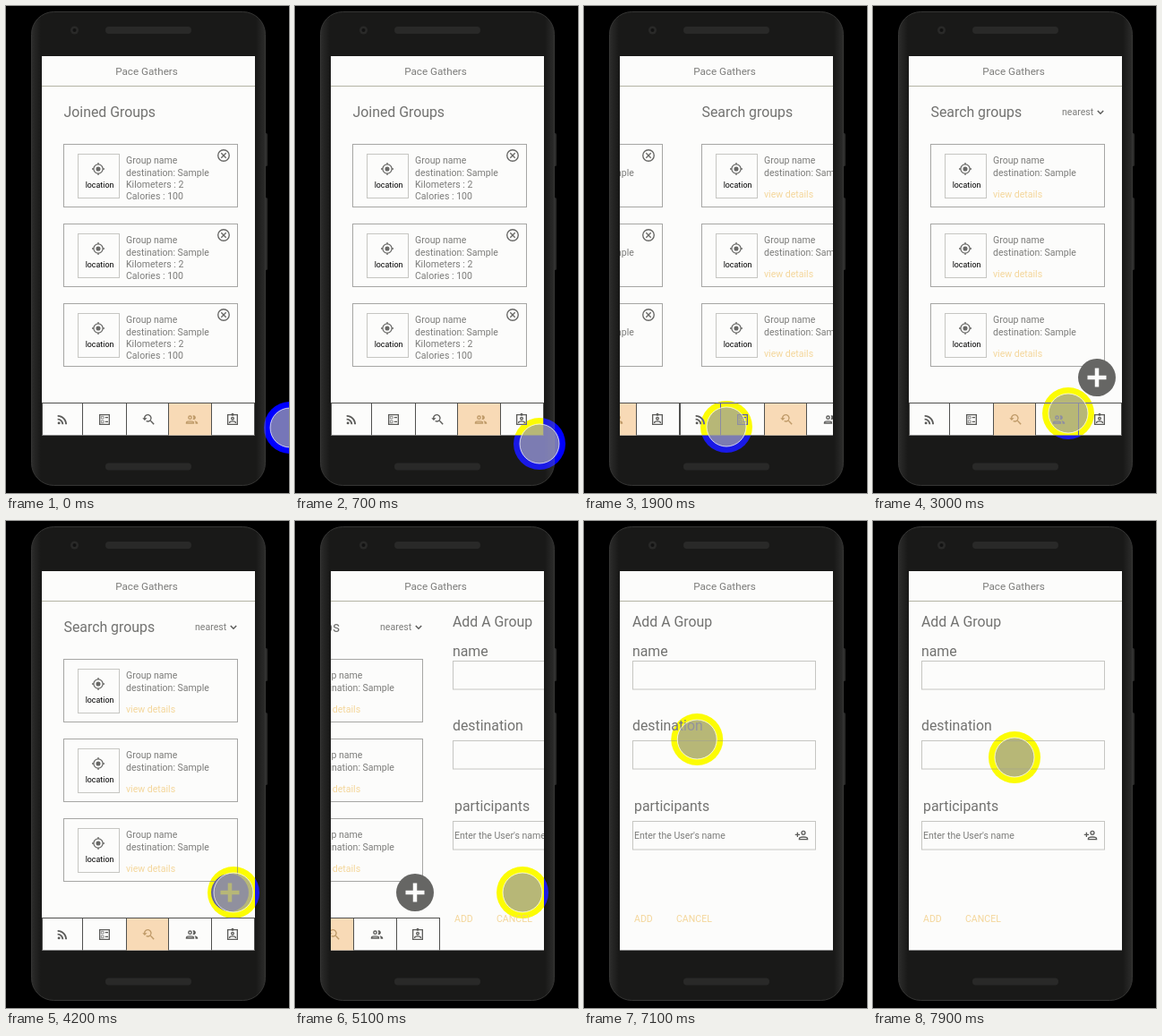
Recreate the animation shown at these times as an HTML page. Size 316 by 544 pixels, loop 8 s.

```html
<!DOCTYPE html>
<html lang="en">
<head>
<meta charset="utf-8">
<title>Group app walkthrough</title>
<style>
html, body { margin: 0; width: 100%; height: 100%; overflow: hidden; background: #000; }
svg { display: block; width: 316px; height: 544px; font-family: Roboto, Arial, sans-serif; }
text { fill: #7c7c7a; font-size: 10.55px; }
.title { font-size: 15.85px; fill: #727270; }
.link { fill: #f4d69a; }
.line { fill: none; stroke: #a6a6a4; stroke-width: 1; }
.field { fill: none; stroke: #c6c6c2; stroke-width: 1; }
.ring { mix-blend-mode: difference; }
</style>
</head>
<body>
<svg viewBox="0 0 316 544">
  <defs>
    <clipPath id="view"><rect x="40" y="90" width="238" height="389.5"/></clipPath>
    <linearGradient id="body">
      <stop offset="0" stop-color="#2c2c2b"/>
      <stop offset=".04" stop-color="#191918"/>
      <stop offset=".96" stop-color="#191918"/>
      <stop offset="1" stop-color="#2c2c2b"/>
    </linearGradient>
  </defs>
  <rect width="316" height="544" fill="#000"/>
  <g fill="#2a2a29">
    <rect x="287" y="142" width="5" height="37" rx="1.5"/>
    <rect x="287" y="214" width="5" height="81" rx="1.5"/>
  </g>
  <rect x="28.5" y="6.5" width="261" height="529" rx="25" fill="url(#body)" stroke="#363635"/>
  <g fill="#292928">
    <rect x="111" y="23" width="96" height="8" rx="4"/>
    <rect x="111" y="510.5" width="96" height="8" rx="4"/>
    <circle cx="76.5" cy="27" r="4.5"/>
  </g>
  <circle cx="76.5" cy="27" r="2" fill="#121212"/>
  <rect x="40" y="56" width="238" height="423.5" fill="#fcfcfb"/>
  <text x="157" y="77" text-anchor="middle" style="font-size:11.7px">Pace Gathers</text>
  <path d="M40 89.5H278" stroke="#b4b4a4"/>
  <g clip-path="url(#view)">
    <g id="joined"></g>
    <g id="search"></g>
    <g id="form"></g>
  </g>
  <g id="cursor">
    <circle class="ring" r="29" fill="#00f"/>
    <circle r="22" fill="#a0a0a0" fill-opacity=".74" stroke="#fff" stroke-opacity=".75"/>
  </g>
</svg>
<script>
const LOOP = 8000, STEP = 100, WIDTH = 238;
const INK = '#686866', TAB_INK = '#5c5c5a';
const el = id => document.getElementById(id);

// Icons on a 24-unit grid
const ICONS = {
  feed: '<path d="M4 4.44v2.83c7.03 0 12.73 5.7 12.73 12.73h2.83c0-8.59-6.97-15.56-15.56-15.56zm0 5.66v2.83c3.9 0 7.07 3.17 7.07 7.07h2.83c0-5.47-4.43-9.9-9.9-9.9z"/><circle cx="6.2" cy="17.8" r="2.2"/>',
  list: '<path fill="none" stroke="currentColor" stroke-width="2" d="M4 4H20V20H4ZM13 8.5H18M13 15.5H18"/><path fill="none" stroke="currentColor" d="M6.5 6.5h4v4h-4zM6.5 13.5h4v4h-4z"/>',
  find: '<path d="M17 14h-.8l-.27-.27A6.5 6.5 0 1 0 4.5 9.5H2l3.84 4 4.16-4H6.5A4.5 4.5 0 1 1 9.2 13.62L7.7 15.1a6.5 6.5 0 0 0 7.52-.67l.27.27v.79l5 5L22 19z"/>',
  people: '<g fill="none" stroke="currentColor" stroke-width="2"><circle cx="9" cy="8.5" r="2.5"/><path d="M3 18v-.75C3 13.9 15 13.9 15 17.25V18Z"/></g><path d="M16 13.8c1.2.85 2 2 2 3.45V19h4v-1.75c0-2-3.5-3.2-6-3.45zM15 12a3.5 3.5 0 1 0-1.5-6.65 5.5 5.5 0 0 1 0 6.3A3.5 3.5 0 0 0 15 12z"/>',
  badge: '<g fill="none" stroke="currentColor" stroke-width="2"><path d="M4 4H20V20H4Z"/><circle cx="12" cy="10" r="2"/><path d="M7 18v-1c0-3 10-3 10 0v1"/></g><circle cx="12" cy="3.5" r="2.3"/>',
  spot: '<circle cx="12" cy="12" r="4"/><g fill="none" stroke="currentColor" stroke-width="2"><circle cx="12" cy="12" r="8"/><path d="M12 1V4M12 20V23M1 12H4M20 12H23"/></g>',
  close: '<g fill="none" stroke="currentColor" stroke-width="2"><circle cx="12" cy="12" r="9.2"/><path d="M8 8L16 16M16 8L8 16"/></g>',
  invite: '<g fill="none" stroke="currentColor" stroke-width="2"><circle cx="15" cy="8" r="3"/><path d="M8 19v-1c0-4 14-4 14 0v1ZM5 7V15M1 11H9"/></g>'
};

const icon = (name, x, y, scale, color) =>
  `<g transform="translate(${x} ${y}) scale(${scale}) translate(-12 -12)" fill="${color}" color="${color}">${ICONS[name]}</g>`;
const text = (x, y, words, cls = '') => `<text x="${x}" y="${y}" class="${cls}">${words}</text>`;
const box = (x, y, w, h, cls) => `<rect x="${x}" y="${y}" width="${w}" height="${h}" class="${cls}"/>`;

function card(y, joined) {
  let out = box(64.5, y + .5, 194, 70, 'line') + box(80.5, y + 11.5, 46, 49, 'field')
    + icon('spot', 103, y + 28, .64, INK)
    + `<text x="104.5" y="${y + 49}" text-anchor="middle" style="font-size:8.9px;fill:#000">location</text>`
    + text(134, y + 22, 'Group name') + text(134, y + 35.5, 'destination: Sample');
  out += joined
    ? text(134, y + 48.5, 'Kilometers : 2') + text(134, y + 61.5, 'Calories : 100')
      + icon('close', 243, y + 13, .68, INK)
    : text(134, y + 59.5, 'view details', 'link');
  return out;
}
const cards = joined => [154, 243, 332].map(y => card(y, joined)).join('');

function tabs(active) {
  const edges = [40.5, 85.5, 134.5, 181.5, 229.5, 277.5];
  const names = ['feed', 'list', 'find', 'people', 'badge'];
  const centres = [63, 110, 159, 207.5, 253];
  const on = edges[active];
  return `<rect x="${on}" y="444" width="${edges[active + 1] - on}" height="36" fill="#f8dab6"/>`
    + `<path fill="none" stroke="#50504e" d="M40 443.5H278${edges.map(x => `M${x} 444V480`).join('')}"/>`
    + names.map((n, i) => icon(n, centres[i], 462, .67, i === active ? '#bf9a68' : TAB_INK)).join('');
}

el('joined').innerHTML = text(64.5, 124, 'Joined Groups', 'title') + cards(true) + tabs(3);

el('search').innerHTML = text(64.5, 124, 'Search groups', 'title') + text(211, 122, 'nearest')
  + `<path d="M250.8 117L254 120.2L257.2 117" fill="none" stroke="${TAB_INK}" stroke-width="1.5"/>`
  + cards(false) + tabs(2)
  + '<circle cx="250" cy="415" r="21" fill="#666664"/>'
  + '<path d="M239.5 415H260.5M250 404.5V425.5" stroke="#fcfcfb" stroke-width="4.5"/>';

el('form').innerHTML = text(54, 118, 'Add A Group', 'title') + text(54, 151, 'name', 'title')
  + text(54, 234, 'destination', 'title') + text(56, 323.5, 'participants', 'title')
  + [156.5, 245.5, 335.5].map(y => box(54.5, y, 204, 31.5, 'field')).join('')
  + text(56, 354.5, "Enter the User's name") + icon('invite', 243, 351, .66, TAB_INK)
  + text(56, 447.5, 'ADD', 'link') + text(103, 447.5, 'CANCEL', 'link');

// Pointer path: time, x, y
const PATH = [
  [0, 317, 471], [100, 306, 476], [500, 306, 476], [900, 240, 502], [1300, 160, 485],
  [1400, 159, 470], [2700, 159, 470], [3000, 218, 455], [3600, 240, 440], [3800, 256, 422],
  [4000, 256, 422], [4200, 254, 415], [5900, 254, 415], [6000, 250, 405], [6300, 178, 234],
  [6700, 160, 166], [6800, 160, 166], [7200, 115, 270], [7500, 80, 428], [7700, 98, 414],
  [7800, 130, 212], [7900, 158, 264]
];

function pointer(t) {
  const i = PATH.findIndex(p => p[0] >= t);
  if (i === 0) return PATH[0].slice(1);
  const [t0, x0, y0] = PATH[i - 1], [t1, x1, y1] = PATH[i];
  const k = (t - t0) / (t1 - t0);
  return [x0 + (x1 - x0) * k, y0 + (y1 - y0) * k];
}

function push(t, start) {
  const k = Math.min(1, Math.max(0, (t - start) / 629));
  return k * k * (3 - 2 * k);
}

function draw(now) {
  const t = Math.floor(now % LOOP / STEP) * STEP;
  const page = push(t, 1491) + push(t, 4791);
  ['joined', 'search', 'form'].forEach((id, i) => {
    const shift = Math.round((i - page) * WIDTH);
    el(id).setAttribute('transform', `translate(${shift} 0)`);
    el(id).setAttribute('visibility', Math.abs(shift) < WIDTH ? 'visible' : 'hidden');
  });
  const [x, y] = pointer(t);
  // Move the circles themselves so the ring blends with the whole stage
  for (const c of el('cursor').children) {
    c.setAttribute('cx', x);
    c.setAttribute('cy', y);
  }
}

const begin = performance.now();
function tick() {
  draw(performance.now() - begin);
  requestAnimationFrame(tick);
}
tick();
</script>
</body>
</html>
```
